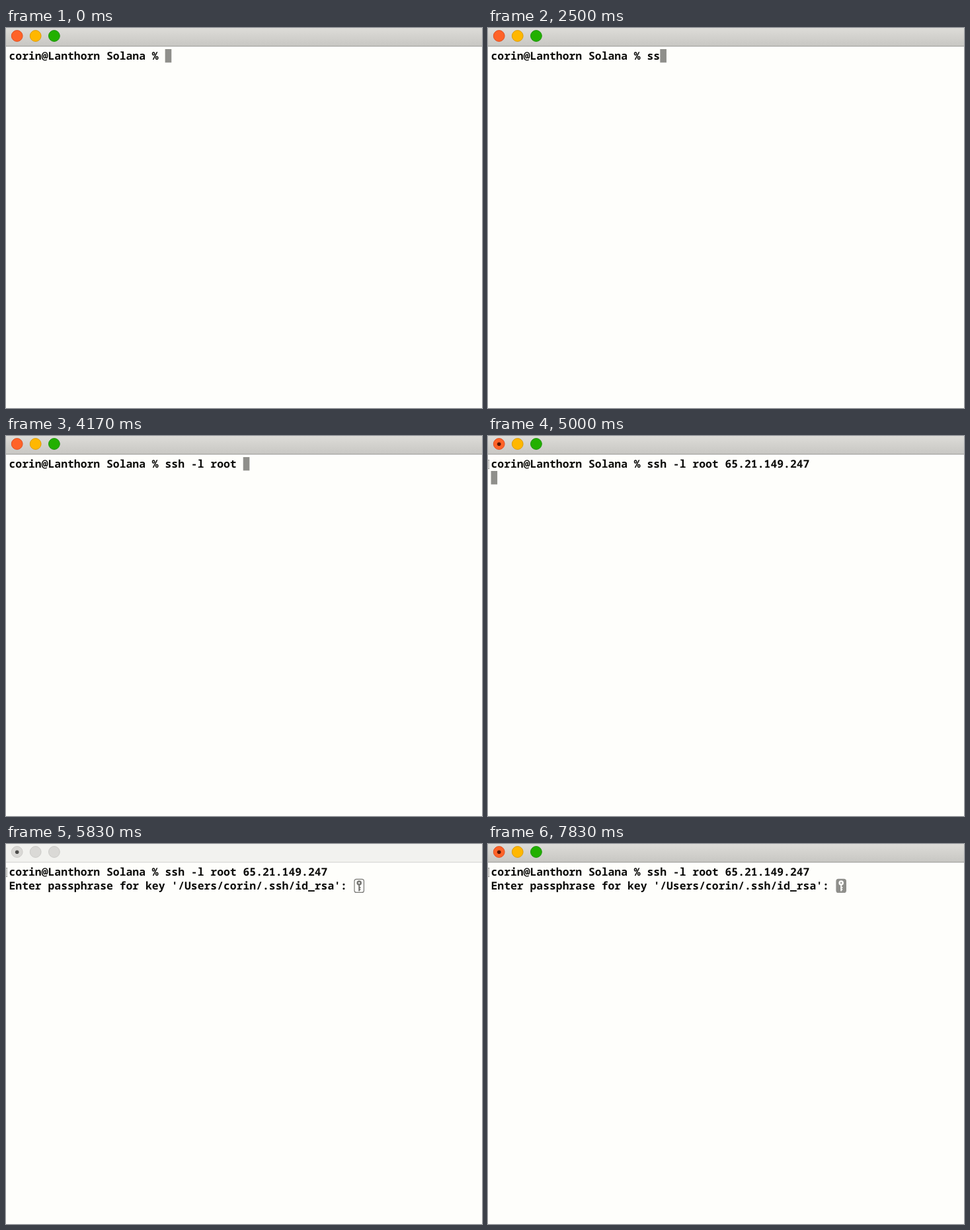
An HTML page that plays this animation: 720x576 px, repeating every 8 s.

```html
<!DOCTYPE html>
<html lang="en">
<head>
<meta charset="utf-8">
<title>Terminal</title>
<style>
  html, body { margin: 0; width: 100%; height: 100%; overflow: hidden; background: #fefefb; }
  svg { display: block; width: 720px; height: 576px; }
  text {
    font: 600 16.4px "Noto Sans Mono", "DejaVu Sans Mono", monospace;
    fill: #0c0c0a; white-space: pre; text-rendering: geometricPrecision;
  }
  .bar { fill: url(#bar); }
  .edge { fill: #a3a3a0; }
  .light { stroke-width: 1; }
  .red { fill: #ff6328; stroke: #df5024; }
  .yellow { fill: #ffb700; stroke: #dc9c08; }
  .green { fill: #22b000; stroke: #1c9208; }
  .dot { fill: #571400; }
  .block { fill: #8f8f8b; }
  .box { fill: #8f8f8b; stroke: #8f8f8b; }
  .key { fill: none; stroke: #fefefb; }
  .inactive .bar { fill: #f2f2ef; }
  .inactive .edge { fill: #d8d8d5; }
  .inactive .light { fill: #dad9d6; stroke: #cccbc8; }
  .inactive .dot { fill: #4c4c4a; }
  .inactive .box { fill: #fefefb; stroke: #777774; }
  .inactive .key { stroke: #777774; }
</style>
</head>
<body>
<svg id="stage" viewBox="0 0 720 576">
  <defs>
    <linearGradient id="bar" x2="0" y2="1">
      <stop offset="0" stop-color="#dddcd8"/>
      <stop offset="1" stop-color="#c8c7c3"/>
    </linearGradient>
  </defs>
  <rect width="720" height="576" fill="#fefefb"/>
  <rect class="bar" width="720" height="27"/>
  <rect class="edge" y="27" width="720" height="1.2"/>
  <circle class="light red" cx="16.7" cy="12" r="8.4"/>
  <circle class="light yellow" cx="44.7" cy="12" r="8.4"/>
  <circle class="light green" cx="72.9" cy="12" r="8.4"/>
  <circle class="dot" id="dot" cx="16.7" cy="12.3" r="2.8"/>
  <path id="mark" d="M0 36.5H2.2M1.2 36.5V49.5M0 49.5H2.2" fill="none" stroke="#9a9a97"/>
  <rect class="block" id="cursor" width="9.6" height="20.4"/>
  <text id="command" x="4.5" y="48.4"></text>
  <text id="answer" x="4.5" y="69.2"></text>
  <g id="lock">
    <rect class="box" x="527" y="53.4" width="14.4" height="20" rx="3" stroke-width="1.2"/>
    <circle class="key" cx="534.2" cy="59" r="2.5" stroke-width="2.6"/>
    <path class="key" d="M534.2 61V71.5M534.2 66H536.4M534.2 69H536.2" stroke-width="2"/>
  </g>
</svg>
<script>
  const LOOP = 8000, LEFT = 4.5, PITCH = 9.84;
  const PROMPT = "corin@Lanthorn Solana % ";
  const COMMAND = "ssh -l root 65.21.149.247";
  const QUESTION = "Enter passphrase for key '/Users/corin/.ssh/id_rsa': ";

  // [time in ms, characters typed]
  const TYPING = [
    [0, 0], [2500, 2], [2670, 3], [2830, 5], [3170, 6], [3500, 7],
    [3670, 8], [3830, 9], [4000, 11], [4170, 12], [4500, COMMAND.length]
  ];
  const SENT = 5000, ASKED = 5330, LOCKED = 5500, BLUR = 5830, FOCUS = 7830;

  const el = id => document.getElementById(id);
  const show = (id, on) => el(id).setAttribute("visibility", on ? "visible" : "hidden");
  const start = performance.now();

  function draw(t) {
    const typed = TYPING.filter(step => step[0] <= t).pop()[1];
    const sent = t >= SENT, locked = t >= LOCKED;
    const command = PROMPT + COMMAND.slice(0, typed);
    const answer = t >= ASKED ? QUESTION : "";
    const column = (sent ? answer : command).length;

    el("command").textContent = command;
    el("answer").textContent = answer;
    el("cursor").setAttribute("x", LEFT + column * PITCH);
    el("cursor").setAttribute("y", sent ? 53 : 32);
    show("cursor", !locked);
    show("lock", locked);
    show("dot", sent);
    show("mark", sent);
    el("stage").classList.toggle("inactive", t >= BLUR && t < FOCUS);
  }

  function tick() {
    draw((performance.now() - start) % LOOP);
    requestAnimationFrame(tick);
  }
  tick();
</script>
</body>
</html>
```
